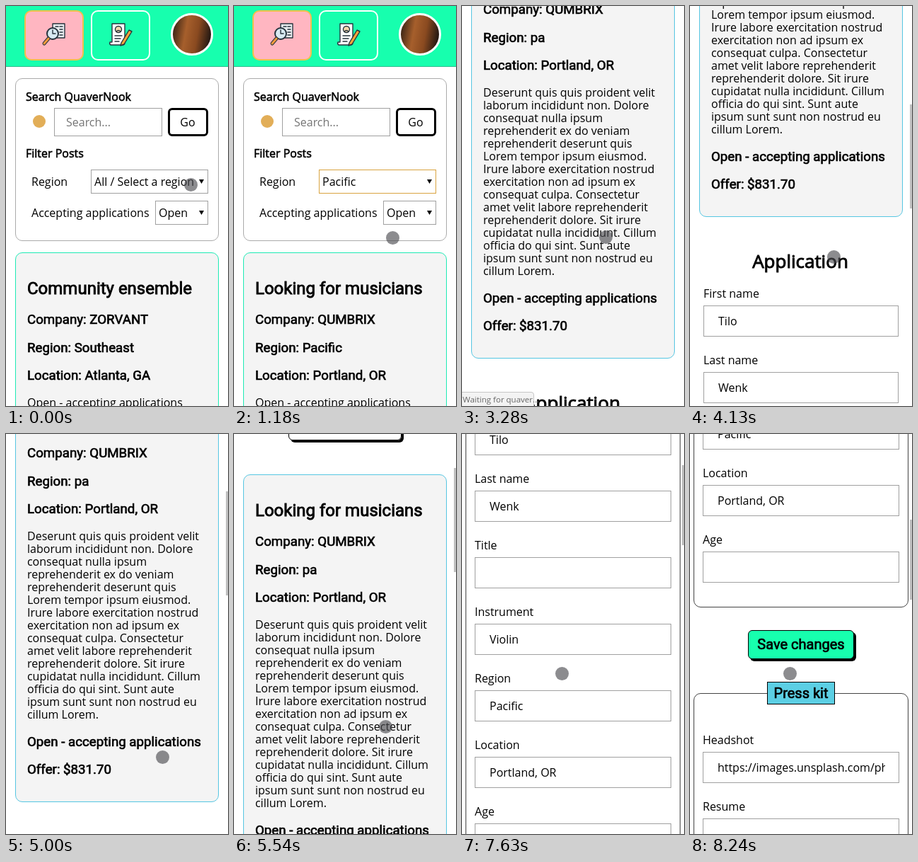
Recreate the animation shown at these times as an HTML page. Size 314 by 565 pixels, loop 8500 ms.

```html
<!DOCTYPE html>
<html lang="en">
<head>
<meta charset="utf-8">
<title>Music postings walkthrough</title>
<style>
html, body { margin: 0; width: 100%; height: 100%; overflow: hidden; background: #fff; }
#stage { position: relative; width: 314px; height: 565px; overflow: hidden; color: #000; }
#stage div { position: absolute; box-sizing: border-box; white-space: nowrap; }
#world { left: 0; top: 0; width: 314px; height: 2825px; }
.page { left: 0; top: 0; }
.t { line-height: 20px; }
.o { font-family: "Open Sans", sans-serif; }
.r { font-family: Roboto, sans-serif; }
.b { -webkit-text-stroke: .036em; }
.box { border: 1px solid #a0a0a0; overflow: hidden; }
.card { border: 1px solid #1deab5; border-radius: 10px; background: #f4f4f4; }
.blue { border-color: #55c6e2; }
.panel { border: 1px solid #444; border-radius: 10px; }
.btn { border: 1px solid #000; border-radius: 6px; box-shadow: 3px 3px #000; }
.arrow { width: 7px; height: 6px; background: #000; clip-path: polygon(0 0, 100% 0, 50% 100%); }
#header { left: 0; top: 0; width: 314px; height: 86px; background: #17ffae; border-bottom: 1px solid #35b98f; }
.tab { top: 6px; width: 84px; height: 71px; border: 2px solid #fff; border-radius: 10px; }
.tab.on { background: #ffb6c1; border-color: #f3c04b; }
#avatar { left: 233px; top: 10px; width: 60px; height: 60px; border: 3px solid #fff; border-radius: 50%;
  background: linear-gradient(100deg, #3a2415 5%, #a65f2c 35%, #8a4a20 62%, #2b1c14 90%); }
#logo { left: 38px; top: 154px; width: 18px; height: 18px; border-radius: 50%; }
#status { left: -1px; top: 545px; width: 103px; height: 21px; background: #f3f3f3; border: 1px solid #c6c6c6;
  border-radius: 0 4px 0 0; color: #666; font-size: 11.5px; line-height: 20px; padding-left: 1px; }
#thumb { left: 311px; width: 3px; background: #c1c1c1; }
#cursor { width: 19px; height: 19px; margin: -9.5px; border-radius: 50%; }
svg { position: absolute; left: 0; top: 0; }
</style>
</head>
<body>
<div id="stage">
  <div id="world"></div>
  <div id="status" class="o">Waiting for quaver...</div>
  <div id="thumb"></div>
  <div id="cursor"></div>
</div>
<script>
const $ = id => document.getElementById(id);
const text = (x, y, s, size = 16, cls = 'o', extra = '') =>
  `<div class="t ${cls}" style="left:${x}px;top:${y - 10}px;font-size:${size}px;${extra}">${s}</div>`;
const mid = (x, y, s, size, cls, extra = '') =>
  text(x - 150, y, s, size, cls, 'width:300px;text-align:center;' + extra);
const rect = (x, y, x2, y2, cls, extra = '', inner = '') =>
  `<div class="${cls}" style="left:${x}px;top:${y}px;width:${x2 - x}px;height:${y2 - y}px;${extra}">${inner}</div>`;
const head = (y, s) => text(30, y, s, 24, 'r b');
const line = (y, s) => text(30, y, s, 18.72, 'r b');
const arrow = (x, y) => `<div class="arrow" style="left:${x}px;top:${y}px"></div>`;
const field = (x, x2, y, label, value) => text(x, y, label) +
  rect(x, y + 17, x2, y + 61, 'box', '', rect(20, 0, x2 - x - 21, 42, '', 'overflow:hidden', text(0, 21, value)));

const header = `<div id="header">
  <div class="tab" id="tab1" style="left:26px"></div><div class="tab" id="tab2" style="left:120px"></div>
  <div id="avatar"></div>
  <svg width="314" height="86" fill="none" stroke="#26333d" stroke-width="1.4" stroke-linecap="round" stroke-linejoin="round">
    <path d="M66 25h17v20H66z" fill="#e9edf0"/><path d="M70 29h4M76 29h4M76 33h4M76 37h4M76 41h4"/>
    <circle cx="66" cy="39" r="8" fill="#d8eaf2" stroke-width="2"/><path d="M66 34v5h4"/>
    <path d="M60 46L54 53" stroke-width="5"/><path d="M60 46L54 53" stroke="#f59a3c" stroke-width="3"/>
    <path d="M150 25h18v27q0 3-3 3h-17q-2-1-1-4h3z" fill="#fff"/>
    <circle cx="159" cy="33" r="4.5" fill="#f7d9ad"/><path d="M156 36q3-3 6 0M154 42h10M154 46h8M154 50h6"/>
    <path d="M163 52L174 34l4 2-11 18-5 2z" fill="#f5a53c"/>
  </svg></div>`;

const post = (y, title, company, region, place) => rect(13, y, 301, y + 328, 'card') +
  head(y + 51, title) + line(y + 95, 'Company: ' + company) + line(y + 135, 'Region: ' + region) +
  line(y + 174, 'Location: ' + place) + text(30, y + 212, 'Open - accepting applications') +
  rect(82, y + 251, 232, y + 295, 'btn', 'background:#ff4b9c') +
  mid(157, y + 273, 'View details', 20, 'r', 'color:#fff');

const filters = rect(13, 102, 301, 332, 'box', 'border-radius:10px;border-color:#aaa') +
  text(28, 128, 'Search QuaverNook', 16, 'o b') + '<div id="logo"></div>' +
  rect(68, 144, 221, 184, 'box') + text(85, 164, 'Search...', 16, 'o', 'color:#757575') +
  rect(229, 144, 286, 184, '', 'border:3px solid #000;border-radius:6px') + mid(257, 164, 'Go', 16, 'o') +
  text(28, 208, 'Filter Posts', 16, 'o b') + text(36, 248, 'Region') +
  `<div id="region" class="box" style="left:120px;top:231px;width:166px;height:34px"></div>` +
  `<div id="choice" class="t o" style="left:125px;top:238px"></div>` + arrow(273, 245) +
  text(36, 292, 'Accepting applications') + rect(211, 275, 286, 309, 'box') + text(216, 292, 'Open') + arrow(273, 289);

const body = `Deserunt quis quis proident velit|laborum incididunt non. Dolore|consequat nulla ipsum|reprehenderit ex do veniam|reprehenderit deserunt quis|Lorem tempor ipsum eiusmod.|Irure labore exercitation nostrud|exercitation non ad ipsum ex|consequat culpa. Consectetur|amet velit labore reprehenderit|reprehenderit dolore. Sit irure|cupidatat nulla incididunt. Cillum|officia do qui sint. Sunt aute|ipsum sunt sunt non nostrud eu|cillum Lorem.`;

const detail = rect(77, 134, 237, 194, 'btn') + mid(157, 154, 'Return to', 18, 'r') + mid(157, 174, 'Dashboard', 18, 'r') +
  rect(13, 242, 301, 830, 'card blue') + head(293, 'Looking for musicians') +
  line(337, 'Company: QUMBRIX') + line(377, 'Region: pa') + line(416, 'Location: Portland, OR') +
  body.split('|').map((s, i) => text(30, 454 + 18 * i, s)).join('') +
  line(745, 'Open - accepting applications') + line(784, 'Offer: $831.70') +
  mid(156, 892, 'Application', 26, 'o b') +
  field(19, 295, 938, 'First name', 'Tilo') + field(19, 295, 1032, 'Last name', 'Wenk');

const legend = (y, s) => rect(109, y, 205, y + 32, '', 'background:#5ccfe4;border:1px solid #000') + mid(157, y + 16, s, 20, 'r b');
const entries = [['First name', 'Tilo'], ['Last name', 'Wenk'], ['Title', ''], ['Instrument', 'Violin'],
  ['Region', 'Pacific'], ['Location', 'Portland, OR'], ['Age', '']];
const profile = rect(5, 124, 309, 850, 'panel') + legend(108, 'Profile') +
  entries.map(([label, value], i) => field(18, 296, 190 + 94 * i, label, value)).join('') +
  rect(82, 882, 232, 923, 'btn', 'background:#17ffae') + mid(157, 902, 'Save changes', 20, 'r b') +
  rect(5, 971, 309, 1500, 'panel') + legend(955, 'Press kit') +
  field(18, 296, 1037, 'Headshot', 'https://images.unsplash.com/photo-15') + field(18, 296, 1131, 'Resume', '');

const pages = {
  filters,
  southeast: post(348, 'Community ensemble', 'ZORVANT', 'Southeast', 'Atlanta, GA'),
  pacific: post(348, 'Looking for musicians', 'QUMBRIX', 'Pacific', 'Portland, OR') +
    post(693, 'Quartet seeks cellist', 'BOLTRAV', 'Pacific', 'Fresno, CA'),
  detail, profile
};
$('world').innerHTML = header + Object.entries(pages).map(([id, html]) => `<div class="page" id="${id}">${html}</div>`).join('');

// Piecewise linear track: [time, ...values]
function track(keys, t) {
  let i = keys.findIndex(k => k[0] > t);
  if (i === 0) return keys[0].slice(1);
  if (i < 0) return keys[keys.length - 1].slice(1);
  const a = keys[i - 1], b = keys[i], p = (t - a[0]) / (b[0] - a[0]);
  return a.slice(1).map((v, j) => v + (b[j + 1] - v) * p);
}
const scrollKeys = [[1960, 0], [2200, 80], [2500, 300], [2659, 300], [2660, 332], [3290, 332], [3400, 385], [3600, 500], [3740, 532],
  [4500, 532], [4700, 440], [5000, 310], [5160, 232], [5460, 232], [5860, 0], [6640, 0], [7300, 0], [7500, 100], [8000, 560], [8200, 605]];
const cursorKeys = [[540, 261, 252], [780, 224, 327], [1570, 224, 327], [1960, 201, 427], [2200, 201, 427], [2500, 203, 326],
  [3290, 203, 326], [3600, 203, 354], [4360, 203, 354], [4700, 221, 456], [5460, 221, 456], [6240, 163, 47],
  [7100, 163, 47], [7450, 141, 338]];
const thumbKeys = [[1960, 0], [1961, 1], [2580, 1], [2660, 0], [3290, 0], [3291, 1], [4130, 1], [4210, 0],
  [4500, 0], [4501, 1], [6160, 1], [6240, 0], [7300, 0], [7301, 1]];

function draw(t) {
  const onList = t < 2660, onProfile = t >= 6640, picked = t >= 1100;
  const show = { filters: onList, southeast: onList && !picked, pacific: onList && picked,
    detail: !onList && !onProfile, profile: onProfile };
  for (const id in show) $(id).style.display = show[id] ? '' : 'none';
  $('tab1').classList.toggle('on', onList);
  $('tab2').classList.toggle('on', onProfile);
  $('choice').textContent = picked ? 'Pacific' : 'All / Select a region';
  $('region').style.borderColor = t >= 400 ? '#d9a441' : '';
  const [r, g, b] = track([[1570, 226, 174, 88], [2200, 232, 98, 150]], t);
  $('logo').style.background = `rgb(${r},${g},${b})`;
  $('status').style.display = !onList && t < 3510 ? '' : 'none';

  const y = Math.round(track(scrollKeys, t)[0]), ratio = 565 / (onProfile ? 2825 : 2170);
  $('world').style.top = -y + 'px';
  const thumb = $('thumb').style;
  thumb.top = Math.round(y * ratio) + 'px';
  thumb.height = Math.round(565 * ratio) + 'px';
  thumb.opacity = track(thumbKeys, t)[0];

  const [cx, cy] = track(cursorKeys, t), cursor = $('cursor').style;
  cursor.left = cx + 'px';
  cursor.top = cy + 'px';
  const click = t >= 6560 && t < 6870;
  cursor.background = click ? 'rgba(232,208,40,.7)' : 'rgba(75,75,80,.64)';
  cursor.transform = click ? 'scale(1.2)' : '';
}
const start = performance.now();
(function tick() {
  draw((performance.now() - start) % 8500);
  requestAnimationFrame(tick);
})();
</script>
</body>
</html>
```
